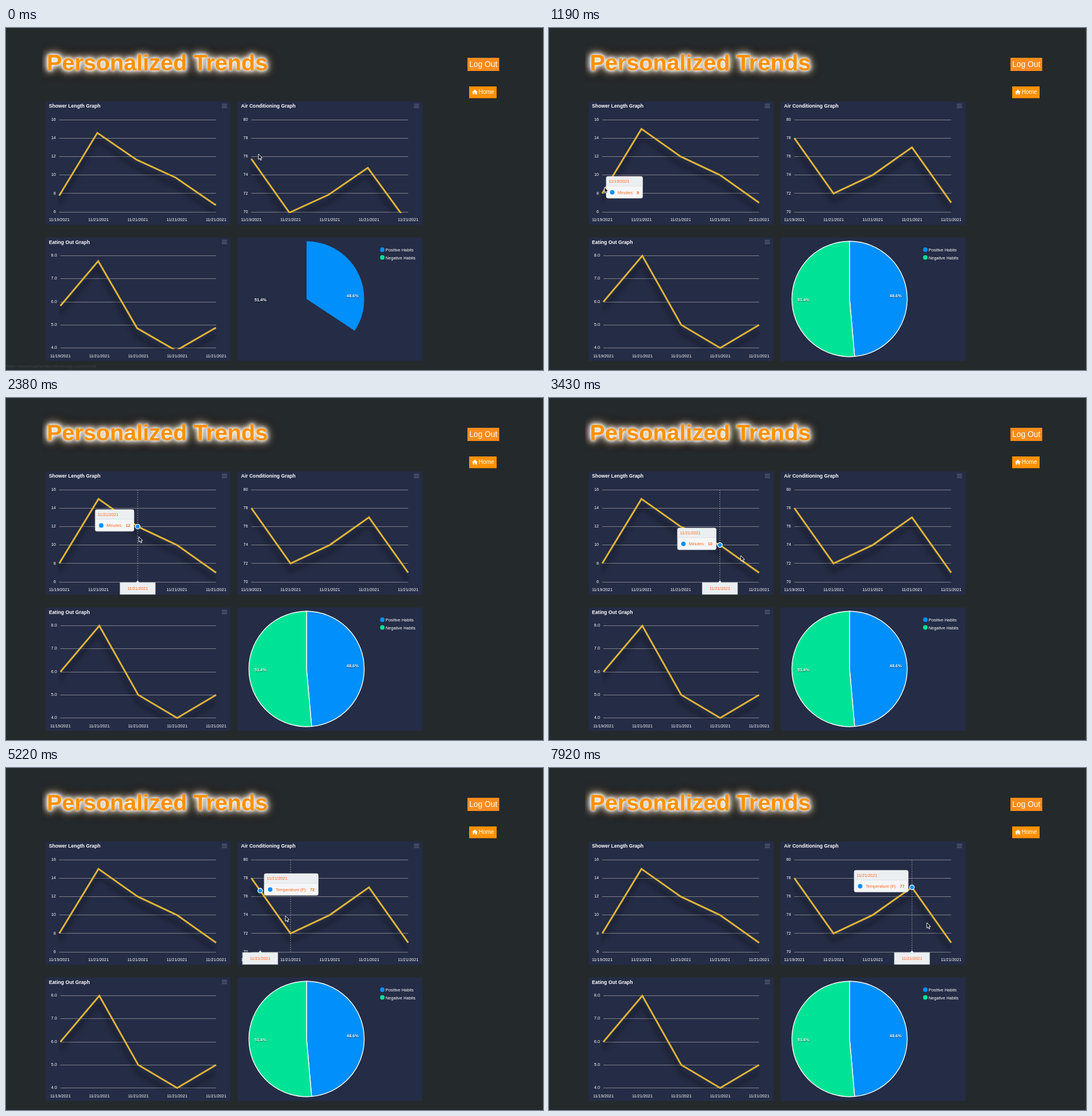
Write an HTML page with a canvas that moves like this. It is 938x597 px and loops after 8 s.

```html
<!DOCTYPE html>
<html>
<head>
<meta charset="utf-8">
<style>
html, body { margin: 0; height: 100%; overflow: hidden; background: #24292b; }
canvas { display: block; }
</style>
</head>
<body>
<canvas id="stage" width="938" height="597"></canvas>
<script>
const ctx = document.getElementById('stage').getContext('2d');
const LOOP = 8000, FONT = '"Liberation Sans", Arial, sans-serif';
const ORANGE = '#ff9100', BLUE = '#008ffb', GREEN = '#00e396';
const PANEL = '#252c45', TIP_BG = '#eceff1', TIP_TEXT = '#ff6a1a';
const PLOT_HEIGHT = 161, PANEL_WIDTH = 323, PANEL_HEIGHT = 215.5;

const charts = [
  { title: 'Shower Length Graph', series: 'Minutes:', min: 6, max: 16, data: [8, 15, 12, 10, 7] },
  { title: 'Air Conditioning Graph', series: 'Temperature (F):', min: 70, max: 80, data: [78, 72, 74, 77, 71] },
  { title: 'Eating Out Graph', min: 4, max: 8, data: [6, 8, 5, 4, 5] }
];
const panelAt = i => ({ left: 69 + 335.5 * (i % 2), top: 128 + 237.5 * (i >> 1) });

charts.forEach((c, i) => {
  Object.assign(c, panelAt(i));
  c.digits = c.max < 10 ? 1 : 0;
  c.tick = c.digits ? 1 : 2;
  c.x0 = c.left + 24 + 2 * c.digits;
  c.x1 = c.left + 298;
  c.y0 = c.top + 32;
  c.y1 = c.y0 + PLOT_HEIGHT;
  c.gap = (c.x1 - c.x0) / 4;
  c.x = n => c.x0 + n * c.gap;
  c.y = v => c.y1 - (v - c.min) * PLOT_HEIGHT / (c.max - c.min);
});

// Turning points of the pointer: tick, x, y
const pointerPath = [
  [0, 441, 220], [7, 80, 268], [8, 97, 278], [12, 344, 262], [16, 232, 242], [19, 165, 235],
  [23, 335, 275], [25, 366, 288], [27, 366, 288], [30, 210, 270], [34, 436, 252], [35, 488, 258],
  [40, 528, 262], [41, 586, 257], [45, 586, 257], [53, 660, 270]
];

const mix = (a, b, f) => a + (b - a) * f;
const ease = t => 0.5 - 0.5 * Math.cos(Math.PI * Math.max(0, Math.min(1, t)));

function pointerAt(tick) {
  const next = Math.max(1, pointerPath.findIndex(p => p[0] >= tick));
  const [t0, x0, y0] = pointerPath[next - 1], [t1, x1, y1] = pointerPath[next];
  const f = (tick - t0) / (t1 - t0);
  return { x: mix(x0, x1, f), y: mix(y0, y1, f) };
}

function hoverAt(tick) {
  if (tick < 2) return null;
  const { x, y } = pointerAt(tick);
  const chart = charts.find(c => x > c.x0 - 4 && x < c.x1 + 4 && y > c.y0 && y < c.y1);
  return chart ? { chart, index: Math.floor((x - chart.x0) / chart.gap + 0.45) } : null;
}

function text(str, x, y, size, { color = '#fff', align = 'left', bold = false } = {}) {
  ctx.font = `${bold ? 'bold ' : ''}${size}px ${FONT}`;
  ctx.textAlign = align;
  ctx.fillStyle = color;
  ctx.fillText(str, x, y);
}

function rect(x, y, w, h, color) {
  ctx.fillStyle = color;
  ctx.fillRect(x, y, w, h);
}

function disc(x, y, r, color) {
  ctx.beginPath();
  ctx.arc(x, y, r, 0, 7);
  ctx.fillStyle = color;
  ctx.fill();
}

function polygon(x, y, points, fill, stroke, lineWidth) {
  ctx.beginPath();
  points.forEach(([dx, dy]) => ctx.lineTo(x + dx, y + dy));
  ctx.closePath();
  ctx.fillStyle = fill;
  ctx.fill();
  if (!stroke) return;
  ctx.strokeStyle = stroke;
  ctx.lineWidth = lineWidth;
  ctx.stroke();
}

function shadow(color, blur, dx = 0, dy = 0) {
  ctx.shadowColor = color;
  ctx.shadowBlur = blur;
  ctx.shadowOffsetX = dx;
  ctx.shadowOffsetY = dy;
}

function drawHeader() {
  ctx.save();
  ctx.beginPath();
  ctx.rect(63, 20, 420, 85);
  ctx.clip();
  for (let blur = 24; blur > 0; blur -= 4) {
    shadow(blur > 16 ? '#ff910059' : '#fff', blur);
    text('Personalized Trends', 71.3, 74, 39.7, { color: ORANGE, bold: true });
  }
  ctx.restore();
  rect(806, 52, 55.5, 23, '#fa8c1e');
  text('Log Out', 833.7, 68, 13.8, { align: 'center' });
  rect(809, 102, 48, 20.5, ORANGE);
  polygon(819, 107.5, [[0, 0], [5, 4.6], [-5, 4.6]], '#fff');
  rect(815.4, 112, 7.2, 4, '#fff');
  rect(818.2, 113, 1.6, 3, ORANGE);
  text('Home', 825.7, 115.3, 10);
}

function drawChart(c, grown) {
  rect(c.left, c.top, PANEL_WIDTH, PANEL_HEIGHT, PANEL);
  text(c.title, c.left + 6, c.top + 11, 8.65, { bold: true });
  for (let i = 0; i < 3; i++) rect(c.left + 308, c.top + 4.6 + i * 2.9, 9, 1, '#6e768c');
  for (let v = c.min; v <= c.max; v += c.tick) {
    rect(c.x0, Math.round(c.y(v) - 0.5), c.x1 - c.x0, 1, '#7f828b');
    text(v.toFixed(c.digits), c.x0 - 6, c.y(v) + 1.7, 7.3, { align: 'right' });
  }
  c.data.forEach((_, i) => text(dateLabel(i), c.x(i), c.y1 + 16, 7.3, { align: 'center' }));

  ctx.save();
  ctx.beginPath();
  ctx.rect(c.x0 - 3, c.y0 - 3, c.x1 - c.x0 + 4.5, PLOT_HEIGHT + 5);
  ctx.clip();
  ctx.beginPath();
  c.data.forEach((v, i) => ctx.lineTo(c.x(i) - (i && c.gap * (1 - grown)), c.y(v * grown)));
  ctx.lineTo(c.x1, c.y(c.data[4] * grown));
  ctx.strokeStyle = '#dfb53a';
  ctx.lineWidth = 3;
  shadow('rgba(0,0,0,.62)', 8, -1, 13);
  ctx.stroke();
  ctx.restore();
}

const dateLabel = i => i ? '11/21/2021' : '11/19/2021';

function slice(from, to, color, done) {
  if (to <= from) return;
  const turn = f => (f - 0.25) * 2 * Math.PI;
  ctx.beginPath();
  ctx.moveTo(525, 473);
  ctx.arc(525, 473, 100.7, turn(from), turn(to));
  ctx.closePath();
  ctx.fillStyle = color;
  ctx.fill();
  if (!done) return;
  ctx.strokeStyle = '#fff';
  ctx.lineWidth = 1.4;
  ctx.stroke();
}

function drawPie(ms) {
  const share = 0.486, blue = ease((ms + 247) / 389), green = ease((ms - 142) / 411);
  const { left, top } = panelAt(3);
  rect(left, top, PANEL_WIDTH, PANEL_HEIGHT, PANEL);
  slice(0, share * blue, BLUE, blue > 0.99);
  slice(share, mix(share, 1, green), GREEN, green > 0.99);
  ctx.save();
  shadow('rgba(0,0,0,.6)', 1.5, 0.5, 1);
  text('48.6%', 605.5, 469.5, 7.4, { align: 'center', bold: true });
  text('51.4%', 444.5, 476.7, 7.4, { align: 'center', bold: true });
  ctx.restore();
  [['Positive Habits', BLUE], ['Negative Habits', GREEN]].forEach(([label, color], i) => {
    disc(657.3, 387 + i * 13.5, 3.9, color);
    text(label, 663, 390.4 + i * 13.5, 7.4);
  });
}

// The tooltip, marker and date flag trail a new hover by part of a step.
function drawTooltip(tick) {
  const now = hoverAt(tick), before = hoverAt(tick - 1);
  if (!now) return;
  const { chart: c, index } = now;
  const entering = !before || before.chart !== c;
  const last = entering ? index : before.index;
  const lag = (a, b) => mix(a, b, 0.226);
  const x = lag(c.x(last), c.x(index));
  const y = lag(c.y(c.data[last]), c.y(c.data[index]));
  const value = String(c.data[index]), date = dateLabel(index);

  if (!entering) {
    ctx.save();
    ctx.setLineDash([2, 2]);
    ctx.strokeStyle = '#b6b6b6';
    ctx.lineWidth = 0.8;
    ctx.beginPath();
    ctx.moveTo(c.x(index), c.y0);
    ctx.lineTo(c.x(index), c.y1);
    ctx.stroke();
    ctx.restore();
    disc(x, y, 4.7, '#fff');
    disc(x, y, 3.4, BLUE);
    polygon(x, c.y1, [[-31, 1], [-3, 1], [0, -2.5], [3, 1], [31, 1], [31, 22], [-31, 22]], TIP_BG, '#90a4ae', 0.5);
    text(date, x, c.y1 + 14, 7.3, { color: TIP_TEXT, align: 'center' });
  }

  ctx.font = `7.3px ${FONT}`;
  const valueX = 25.6 + ctx.measureText(c.series).width;
  const width = valueX + value.length * 4.1 + 6.3;
  const side = i => i < 2 ? 7 : -6.5 - width;
  const left = x + lag(side(last), side(index)), top = y - 29.7;
  ctx.save();
  ctx.beginPath();
  ctx.roundRect(left, top, width, 38, 3);
  ctx.strokeStyle = '#e3e3e3';
  ctx.lineWidth = 0.7;
  ctx.stroke();
  ctx.clip();
  rect(left, top, width, 38, '#f5f6f8');
  rect(left, top, width, 16.5, TIP_BG);
  rect(left, top + 16.5, width, 0.7, '#d5dadd');
  ctx.restore();
  text(date, left + 4.5, top + 11, 7.3, { color: TIP_TEXT });
  disc(left + 10.5, top + 27.7, 3.9, BLUE);
  text(c.series, left + 20, top + 30.4, 7.3, { color: TIP_TEXT });
  text(value, left + valueX, top + 30.4, 7.3, { color: TIP_TEXT, bold: true });
}

function drawPointer({ x, y }) {
  polygon(x, y, [[0, 0], [0, 9.5], [2.2, 7.5], [3.7, 10.8], [5.2, 10.2], [3.8, 7], [6.6, 6.8]], '#000', '#fff', 1);
}

function draw(ms) {
  // Ticks last 150 ms, with a 10 ms shorter one now and then.
  const drift = 10 * Math.min(3, 1 + Math.floor(ms / 1800));
  const tick = Math.min(53, Math.floor((ms + drift) / 150));
  const held = Math.max(0, tick * 150 - 10);
  rect(0, 0, 938, 597, '#24292b');
  drawHeader();
  const grown = ease((713 + held) / 800);
  charts.forEach(c => drawChart(c, grown));
  drawPie(held);
  if (tick === 0) text('https://powerlsatheroku.herokuapp.com/trends', 0, 593, 7.7, { color: '#3d4244' });
  drawTooltip(tick);
  drawPointer(pointerAt(tick));
}

function frame() {
  draw(performance.now() % LOOP);
  requestAnimationFrame(frame);
}
frame();
</script>
</body>
</html>
```
